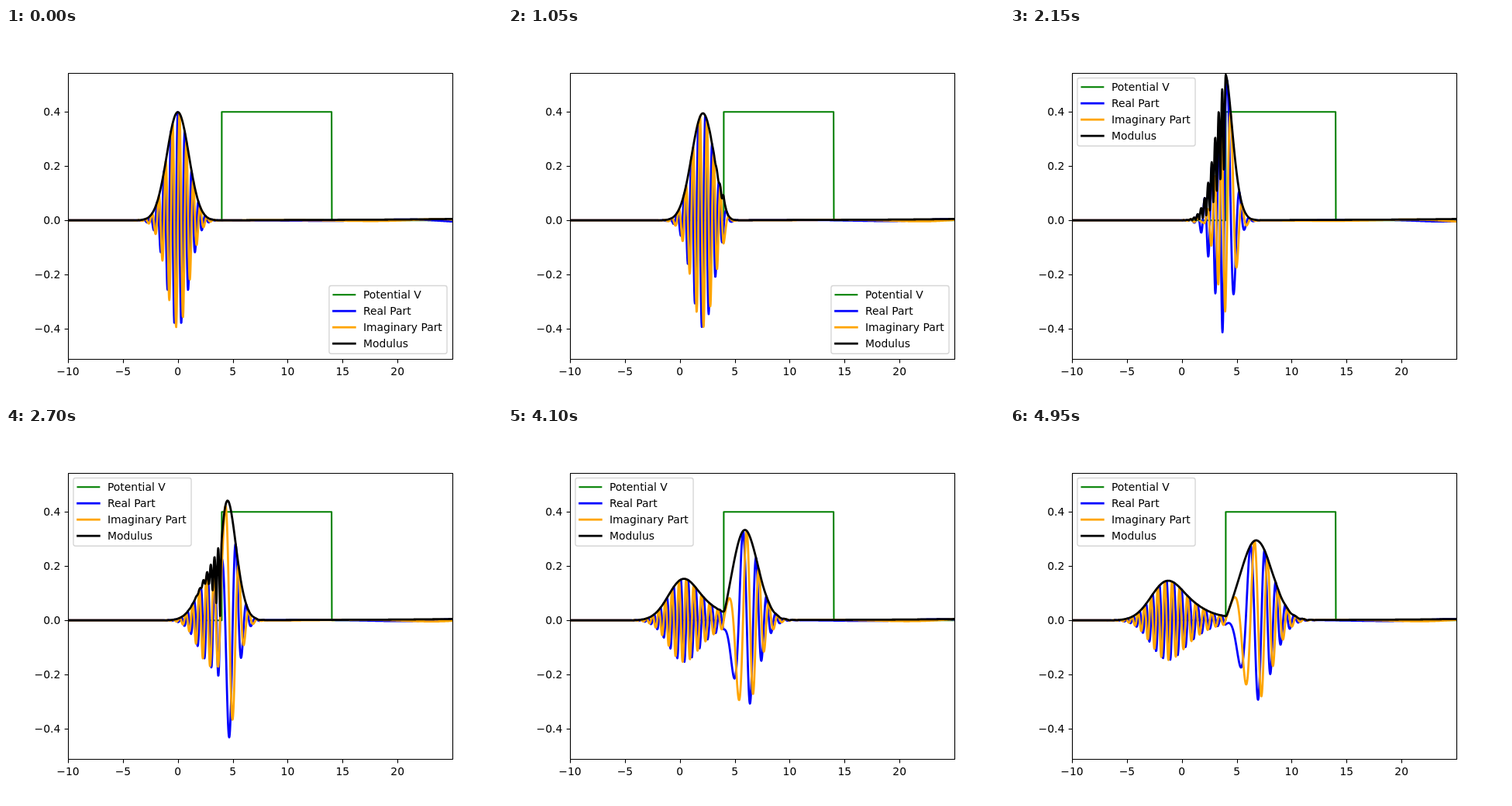
An HTML page with a canvas that plays this animation: 640x480 px, repeating every 5000 ms.

```html
<!DOCTYPE html>
<html lang="en">
<head>
<meta charset="utf-8">
<title>Wave packet at a potential step</title>
<style>
  html, body { margin: 0; width: 100%; height: 100%; overflow: hidden; background: #fff; }
  canvas { display: block; }
</style>
</head>
<body>
<canvas id="plot" width="640" height="480"></canvas>
<script>
const ctx = document.getElementById('plot').getContext('2d');
const FRAMES = 100, FRAME_MS = 50, DT = 0.01;
const K0 = 10, V = 40, WALL = 4, WALL_END = 14;
const X_MIN = -10, DX = 0.025, NX = 1401;
const K_MIN = 5.5, DK = 0.02, NK = 451;
const LEFT = 80, RIGHT = 576, TOP = 57.6, BOTTOM = 427.2;
const px = x => LEFT + (x - X_MIN) * (RIGHT - LEFT) / 35;
const py = y => 248.2 - 350 * y;
const snap = v => Math.floor(v + 0.5) + 0.5;

// Scattering states of the step, sampled on the x grid for every wave number.
const basisRe = new Float64Array(NX * NK), basisIm = new Float64Array(NX * NK);
for (let j = 0; j < NK; j++) {
  const k = K_MIN + j * DK, e = k * k - 2 * V;
  const q = Math.sqrt(Math.max(e, 0)), decay = Math.sqrt(Math.max(-e, 0));
  const d = (k + q) ** 2 + decay ** 2;
  const tr = 2 * k * (k + q) / d, ti = -2 * k * decay / d;
  for (let i = 0; i < NX; i++) {
    const s = X_MIN + i * DX - WALL, n = j * NX + i;
    const phase = (s < 0 ? k : q) * s, c = Math.cos(phase), sn = Math.sin(phase);
    if (s < 0) {
      basisRe[n] = tr * c + ti * sn;
      basisIm[n] = (2 - tr) * sn + ti * c;
    } else {
      const a = Math.exp(-decay * s);
      basisRe[n] = a * (tr * c - ti * sn);
      basisIm[n] = a * (tr * sn + ti * c);
    }
  }
}

const re = new Float64Array(NX), im = new Float64Array(NX);
function evolve(t) {
  re.fill(0);
  im.fill(0);
  for (let j = 0; j < NK; j++) {
    const k = K_MIN + j * DK;
    const w = DK / (2 * Math.PI) * Math.exp(-((k - K0) ** 2) / 2);
    const phase = k * WALL - k * k * t / 2;
    const cr = w * Math.cos(phase), ci = w * Math.sin(phase);
    for (let i = 0, n = j * NX; i < NX; i++, n++) {
      re[i] += cr * basisRe[n] - ci * basisIm[n];
      im[i] += cr * basisIm[n] + ci * basisRe[n];
    }
  }
}

function stroke(points, color, width) {
  ctx.beginPath();
  for (const [x, y] of points) ctx.lineTo(x, y);
  ctx.strokeStyle = color;
  ctx.lineWidth = width;
  ctx.stroke();
}

function curve(value, color) {
  stroke(Array.from(re, (_, i) => [px(X_MIN + i * DX), py(value(i))]), color, 2.78);
}

function text(str, x, y, align) {
  ctx.fillStyle = '#000';
  ctx.textAlign = align;
  ctx.fillText(str, x, y);
}

function axes() {
  ctx.lineCap = 'butt';
  ctx.strokeStyle = '#000';
  ctx.lineWidth = 1.11;
  ctx.strokeRect(80.5, 58.5, 496, 369);
  const label = (v, digits) => v.toFixed(digits).replace('-', '\u2212');
  for (let v = -10; v <= 20; v += 5) {
    const x = snap(px(v));
    stroke([[x, 427.5], [x, 432.4]], '#000', 1.11);
    text(label(v, 0), px(v), 448, 'center');
  }
  for (let n = -2; n <= 2; n++) {
    const y = snap(py(n / 5));
    stroke([[75.6, y], [80.5, y]], '#000', 1.11);
    text(label(n / 5, 1), 70.3, y + 4.5, 'right');
  }
}

function legend(dx, dy) {
  ctx.save();
  ctx.translate(dx, dy);
  ctx.beginPath();
  ctx.roundRect(86.94, 64.54, 152.1, 87.7, 2.78);
  ctx.fillStyle = 'rgba(255,255,255,.8)';
  ctx.fill();
  ctx.strokeStyle = 'rgba(204,204,204,.8)';
  ctx.lineWidth = 1.39;
  ctx.stroke();
  ctx.lineCap = 'square';
  [['Potential V', 'green'], ['Real Part', 'blue'], ['Imaginary Part', 'orange'], ['Modulus', 'black']]
    .forEach(([name, color], i) => {
      const y = 76 + 21 * i;
      stroke([[92.5, y + 0.2], [120.3, y + 0.2]], color, i ? 2.78 : 2.08);
      text(name, 131, y + 5, 'left');
    });
  ctx.restore();
}

function draw(frame) {
  evolve(frame * DT);
  ctx.fillStyle = '#fff';
  ctx.fillRect(0, 0, 640, 480);
  ctx.font = '13.89px "DejaVu Sans", sans-serif';
  ctx.lineJoin = 'round';

  ctx.save();
  ctx.beginPath();
  ctx.rect(LEFT, TOP, RIGHT - LEFT, BOTTOM - TOP);
  ctx.clip();
  const wall = [[X_MIN, 0], [WALL, 0], [WALL, 0.4], [WALL_END, 0.4], [WALL_END + DX, 0], [25, 0]];
  stroke(wall.map(([x, y]) => [px(x), py(y)]), 'green', 2.08);
  curve(i => re[i], 'blue');
  curve(i => im[i], 'orange');
  curve(i => Math.hypot(re[i], im[i]), 'black');
  ctx.restore();

  axes();
  // The legend jumps to the upper left once the packet has cleared that corner.
  if (frame < 22) legend(330, 268);
  else legend(0, 0);
}

let shown = -1;
function tick() {
  const frame = Math.floor(performance.now() / FRAME_MS) % FRAMES;
  if (frame !== shown) draw(shown = frame);
  requestAnimationFrame(tick);
}
tick();
</script>
</body>
</html>
```
